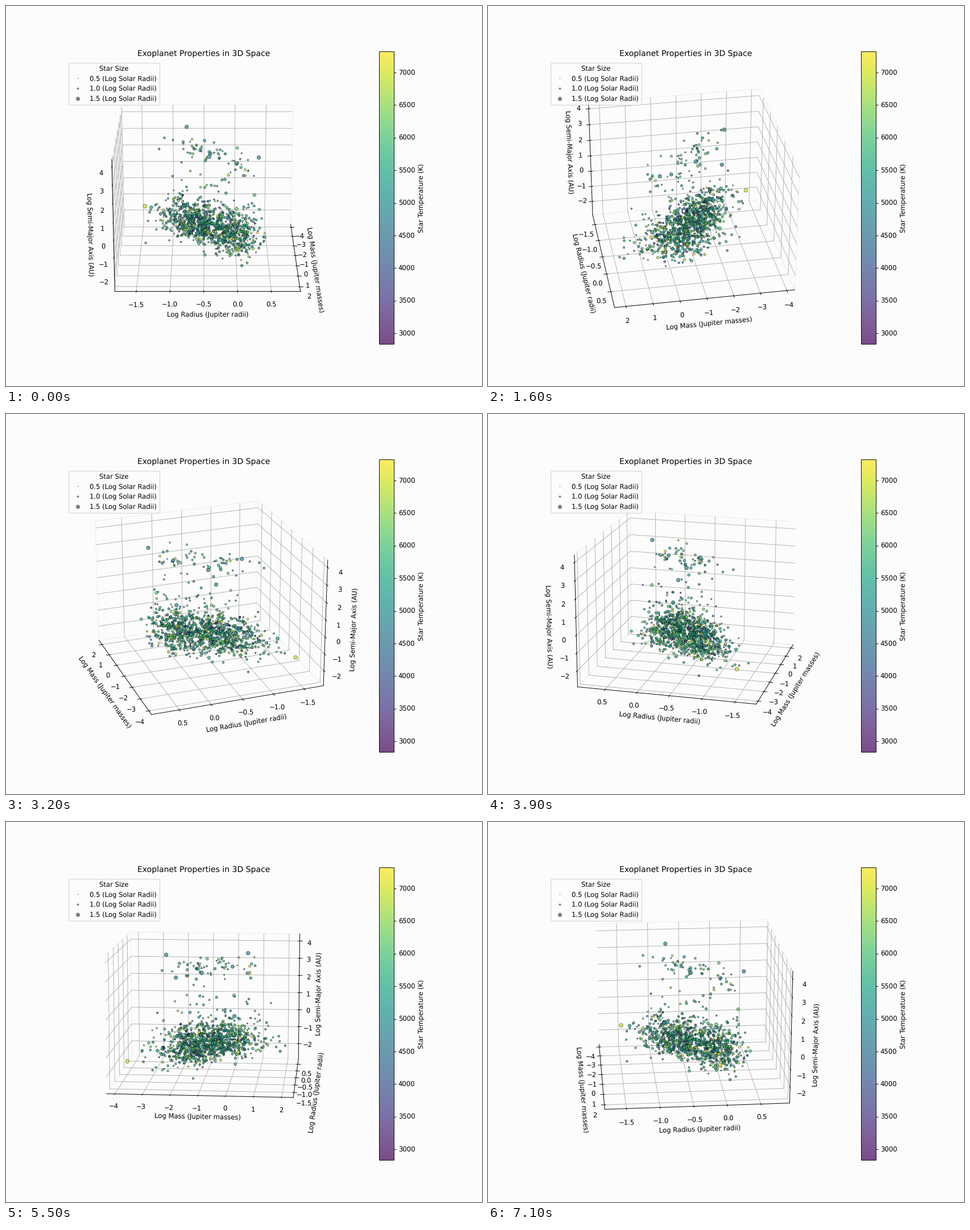
Recreate the animation shown at these times as a matplotlib script. Size 837x669 px, loop 7200 ms.

```python
import numpy as np
import matplotlib.pyplot as plt
from matplotlib.animation import FuncAnimation
from matplotlib.lines import Line2D

WIDTH, HEIGHT, DPI = 837, 669, 83.7
FRAMES, INTERVAL = 72, 100
BACK = "#fcfcfc"
COOLEST, HOTTEST = 2831, 7320
# extremes of log mass, log radius, log semi-major axis
LOW = np.array([-3.87, -1.64, -2.44])
HIGH = np.array([1.99, 0.757, 3.95])

plt.rcParams["text.hinting"] = "none"
rng = np.random.default_rng(11)


def planets(n, axis, axis_spread, width=1.0, tail=0.0):
    """Planets along the track from small worlds (t=0) to giants (t=1)."""
    t = rng.beta(0.45, 0.45, n)
    dm, dr, da = rng.normal(0, 1, (3, n))
    dr *= (0.25 - 0.07 * t) * width
    radius = -0.82 + 0.86 * t + dr
    mass = -1.75 + 1.7 * t + 1.2 * (1 - t) * dr + (0.45 + 0.3 * t) * width * dm
    orbit = axis + axis_spread * da + tail * (rng.exponential(1, n) - 1)
    points = np.column_stack([mass, radius, orbit])
    # reflect stragglers back inside
    points = np.where(points > HIGH, 2 * HIGH - points, points)
    points = np.where(points < LOW, 2 * LOW - points, points)
    return np.clip(points, LOW, HIGH)


def stars(n):
    """Temperature and marker diameter in points."""
    kind = rng.random(n)
    cool, hot, giant = kind < 0.12, kind > 0.79, rng.random(n) < 0.015
    temp = rng.normal(5450, 470, n)
    temp[cool] -= 1700
    temp[hot] += 950
    size = 3.05 * np.exp(rng.normal(0, 0.22, n))
    size[cool] *= 0.75
    size[giant] = rng.uniform(4.6, 6.2, giant.sum())
    temp[giant] = 4950
    return np.clip(temp, COOLEST, HOTTEST), size


points = np.vstack([
    planets(1010, -1.1, 0.45, tail=0.35),
    planets(60, 3.1, 0.35, width=0.7),
    planets(22, 1.2, 0.5),
    # three bright giants and one hot star far from the crowd
    [(-2.41, -0.77, 3.95), (-2.15, -0.40, 2.51),
     (0.47, 0.32, 3.56), (-3.66, -1.46, -1.42)],
])
temps, sizes = stars(len(points))
temps[-4:-1], temps[-1] = 4850, 6950
sizes[-4:] = 5.6

fig = plt.figure(figsize=((WIDTH + 1e-3) / DPI, (HEIGHT + 1e-3) / DPI),
                 dpi=DPI, facecolor=BACK)
ax = fig.add_subplot(111, projection="3d", facecolor=BACK)
scatter = ax.scatter(*points.T, c=temps, s=sizes ** 2, cmap="viridis",
                     vmin=COOLEST, vmax=HOTTEST, alpha=0.7,
                     edgecolors="black", linewidths=0.5, depthshade=False)

bar = fig.colorbar(scatter, ax=ax, pad=0.1)
bar.set_label("Star Temperature (K)")
bar.ax.set_facecolor(BACK)

ax.set_title("Exoplanet Properties in 3D Space")
ax.set_xlabel("Log Mass (Jupiter masses)")
ax.set_ylabel("Log Radius (Jupiter radii)")
ax.set_zlabel("Log Semi-Major Axis (AU)")
ax.set_xlim(-4.301, 2.418)
ax.set_ylim(-1.818, 0.932)
ax.set_zlim(-2.90, 4.41)

for axis in (ax.xaxis, ax.yaxis, ax.zaxis):
    axis.pane.set_alpha(None)
    axis.pane.set_fill(False)
    axis.pane.set_edgecolor("#f0f0f0")

handles = [
    Line2D([], [], ls="", marker="o", ms=1 + 2.3 * radius ** 2,
           mfc="#808080", mec="none", label=f"{radius} (Log Solar Radii)")
    for radius in (0.5, 1.0, 1.5)
]
ax.legend(handles=handles, title="Star Size", loc="upper left",
          facecolor=BACK, labelspacing=0.52, borderaxespad=0.45)


def update(i):
    azim = i * 360 / FRAMES
    ax.view_init(elev=20 + 10 * np.sin(np.radians(azim)), azim=azim)
    return (scatter,)


anim = FuncAnimation(fig, update, frames=FRAMES, interval=INTERVAL,
                     repeat=True, repeat_delay=0, blit=False)
plt.show()
```
